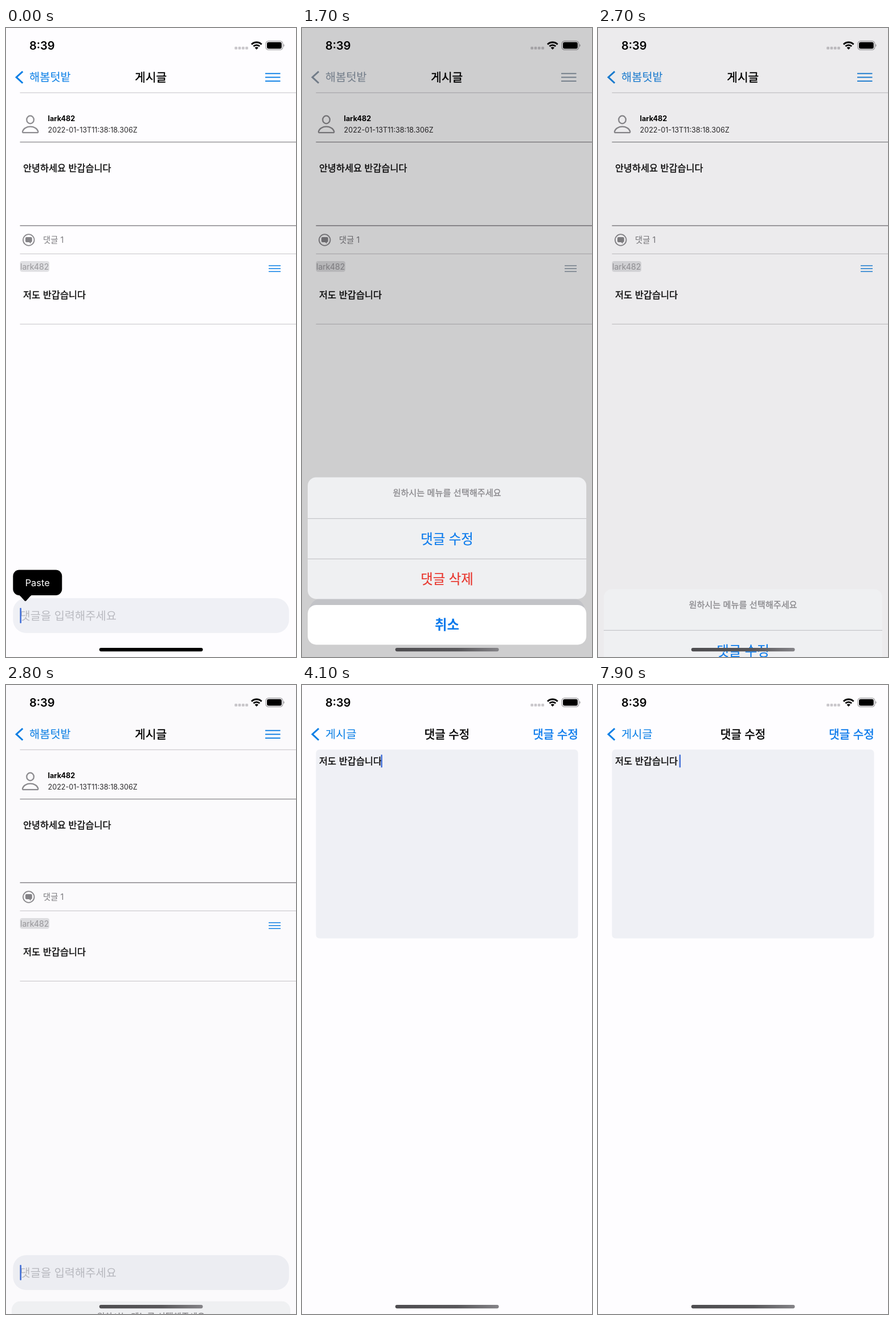
Recreate the animation shown at these times as an HTML page. Size 509 by 1101 pixels, loop 8000 ms.

```html
<!DOCTYPE html>
<html lang="ko">
<head>
<meta charset="utf-8">
<title>댓글 수정</title>
<style>
  html, body { margin: 0; width: 100%; height: 100%; overflow: hidden; background: #fefdff; }
  svg { position: fixed; inset: 0; width: 100%; height: 100%; display: block; }
  text { font-family: Inter, "Noto Sans CJK KR", "Noto Sans CJK", sans-serif; white-space: pre; }
</style>
</head>
<body>
<svg id="stage" viewBox="0 0 509 1101"></svg>
<script>
const W = 509, H = 1101, LOOP = 8000, STEP = 100;
const BG = '#fefdff', FIELD = '#eff0f5', INK = '#000', GREY = '#8a898d', HAIR = '#d0ced2', CARET = '#4370d8';

// Text placed by its vertical middle; bold adds a thin outline of the same colour.
function label(str, x, cy, size, { fill = INK, bold = 0, weight = 400, anchor = 'start', id = '' } = {}) {
  const outline = bold ? ` stroke="${fill}" stroke-width="${bold}"` : '';
  return `<text id="${id}" x="${x}" y="${(cy + size * 0.375).toFixed(1)}" font-size="${size}"` +
    ` font-weight="${weight}" text-anchor="${anchor}" fill="${fill}"${outline}>${str}</text>`;
}
const box = (x, y, w, h, r, fill, more = '') =>
  `<rect x="${x}" y="${y}" width="${w}" height="${h}" rx="${r}" fill="${fill}" ${more}/>`;
const rule = (x, y, x2, color, w = 1.2) =>
  `<path d="M${x} ${y}H${x2}" stroke="${color}" stroke-width="${w}"/>`;
const group = (id, ...parts) => `<g id="${id}">${parts.join('')}</g>`;
const burger = (x, y, w, gap, sw) =>
  [-gap, 0, gap].map(d => rule(x, y + d, x + w, 'currentColor', sw)).join('');

const statusBar = group('status',
  label('8:39', 63.3, 30.6, 20, { weight: 600, anchor: 'middle' }),
  [0, 1, 2, 3].map(i => box(401.3 + i * 6.3, 32.8, 4.7, 4.8, 1.3, '#c9c7cb')).join(''),
  `<g fill="none" stroke="#000" stroke-width="2.9">
     <path d="M431 28.7a12.4 12.4 0 0 1 17.6 0M434.4 32.1a7.6 7.6 0 0 1 10.8 0"/></g>
   <path d="M439.8 37.8l-3.2-3.2a4.6 4.6 0 0 1 6.4 0z"/>`,
  box(456, 22.8, 29.8, 15.4, 4.8, 'none', 'stroke="#a09fa2" stroke-width="1.2"'),
  box(458, 24.8, 25.8, 11.4, 3, INK),
  `<path d="M487 28v5q1.6-.6 1.6-2.5t-1.6-2.5z" fill="#a09fa2"/>`);

const avatar = `<g fill="none" stroke="#8e8d91" stroke-width="2.3">
  <ellipse cx="42.6" cy="160.5" rx="6.3" ry="6.8"/>
  <path d="M31 183.2h23.4q2.4 0 1.9-2.2c-1.4-5.2-7-8.3-13.6-8.3s-12.2 3.1-13.6 8.3q-.5 2.2 1.9 2.2z"/></g>`;
const bubble = `<circle cx="39.8" cy="371" r="9.8" fill="none" stroke="#8a898d" stroke-width="1.8"/>
  <path d="M36 366h7.800q2 0 2 2v5q0 2-2 2h-.3v2.600l-3-2.600h-4.500q-2 0-2-2v-5q0-2 2-2z" fill="#858488"/>`;

const postPage = group('post',
  box(0, 0, W, H, 0, BG),
  rule(24.5, 113.3, W, HAIR),
  avatar,
  label('lark482', 73.5, 158.4, 12.7, { weight: 700 }),
  label('2022-01-13T11:38:18.306Z', 73.5, 178.4, 12.6, { fill: '#2a292b' }),
  rule(24.5, 199.6, W, '#88878b', 1.4),
  label('안녕하세요 반갑습니다', 30, 245, 16.3, { bold: 0.3 }),
  rule(24.5, 346, W, '#88878b', 1.4),
  bubble,
  label('댓글 1', 65, 371, 14.4, { fill: '#7d7c80' }),
  rule(24.5, 395.3, W, HAIR),
  box(24.5, 408, 51.5, 18.8, 4, '#e0e0e3'),
  label('lark482', 25, 417.6, 14.1, { fill: '#98979b' }),
  burger(461, 421.2, 21, 5.1, 1.5),
  label('저도 반갑습니다', 30, 467.3, 16.4, { bold: 0.3 }),
  rule(24.5, 518.3, W, HAIR),
  box(12.3, 998, 484.5, 61, 23, FIELD),
  label('댓글을 입력해주세요', 24.5, 1028.3, 19.8, { fill: '#b9bac0' }),
  box(24.4, 1015, 2.6, 27, 1.2, CARET, 'id="postCaret"'),
  group('paste',
    box(12.3, 948.5, 86, 44.5, 11, INK),
    `<path d="M21 992h26q-3 1-5 3.200l-6.500 7.400q-1.500 1.500-3 0l-6.500-7.400q-2-2.200-5-3.200z"/>`,
    label('Paste', 55.2, 971, 16.4, { fill: '#fff', anchor: 'middle' })),
  box(0, 0, W, H, 0, INK, 'id="postShade"'));

const editPage = group('edit',
  box(0, 0, W, H, 0, BG),
  box(24.5, 113, 460, 330.5, 6, FIELD),
  label('', 30, 133, 16.4, { bold: 0.3, id: 'draft' }),
  box(0, 121.8, 2.5, 22.6, 1.2, CARET, 'id="editCaret"'));

const tinted = { fill: 'currentColor' };
const nav = group('nav',
  `<path d="M29.300 76.200L18.200 86.200L29.300 96.500" fill="none" stroke="currentColor" stroke-width="3"/>`,
  group('backOld', label('해봄텃밭', 41, 86, 19.8, tinted)),
  group('backNew', label('게시글', 41, 86, 19.8, tinted)),
  group('titleOld', label('게시글', 254.2, 86, 20.2, { bold: 0.5, anchor: 'middle' })),
  group('titleNew', label('댓글 수정', 254.5, 86, 20.1, { bold: 0.5, anchor: 'middle' })),
  group('menu', burger(455, 86.3, 26.5, 6.6, 1.9)),
  group('done', label('댓글 수정', 484.8, 86, 20.1, { fill: '#0a7aec', bold: 0.5, anchor: 'end' })));

const centred = (str, cy, size, opt) => label(str, 254.5, cy, size, { anchor: 'middle', ...opt });
const sheet = group('sheet',
  box(10, 766, 489, 213, 15, '#eff0f2'),
  centred('원하시는 메뉴를 선택해주세요', 792.8, 15.2, { fill: '#8a898d', bold: 0.3 }),
  rule(10, 838.2, 499, '#c6c6c9'),
  centred('댓글 수정', 873.5, 23.4, { fill: '#0a7aec', bold: 0.2 }),
  rule(10, 909, 499, '#c6c6c9'),
  centred('댓글 삭제', 944, 23.4, { fill: '#e8372e', bold: 0.2 }),
  box(10, 989.5, 489, 69.5, 15, '#fff'),
  centred('취소', 1024, 23.4, { fill: '#0a7aec', weight: 700 }));

const stage = document.getElementById('stage');
stage.innerHTML = `<defs><linearGradient id="sheen">
    <stop offset="0" stop-color="#4e4d50"/><stop offset=".6" stop-color="#59585b"/>
    <stop offset="1" stop-color="#858488"/></linearGradient></defs>` +
  postPage + editPage + nav + statusBar +
  box(0, 0, W, H, 0, INK, 'id="dim"') + sheet +
  box(163.7, 1085, 181.8, 6.2, 3.1, INK, 'id="home"');

const el = {};
stage.querySelectorAll('[id]').forEach(n => { if (n.id) el[n.id] = n; });

const set = (id, name, value) => el[id].setAttribute(name, value);
const fade = (id, a) => set(id, 'opacity', Math.max(0, Math.min(1, a)).toFixed(3));
const move = (id, x, y = 0) => set(id, 'transform', `translate(${x.toFixed(2)} ${y.toFixed(2)})`);
const mix = (a, b, k) => `rgb(${a.map((v, i) => Math.round(v + (b[i] - v) * k))})`;

// Critically damped spring from 0 to 1.
function spring(t, start, rate) {
  const x = Math.max(0, t - start) * rate / 1000;
  return 1 - (1 + x) * Math.exp(-x);
}
// Last value whose time has come.
const at = (t, keys) => keys.reduce((v, [time, next]) => t >= time ? next : v, keys[0][1]);

const POST_CARET = [[0, 1], [500, .45], [600, 0], [900, .5], [1000, 1], [1500, .45], [1600, 0], [2000, 1]];
const EDIT_CARET = [[0, 0], [4100, 1], [4600, .45], [4700, 0], [5000, 1], [5500, .65], [5600, .2], [5700, 0],
  [5900, .5], [6000, 1], [6800, .5], [6900, 0], [7300, .3], [7400, .7], [7500, 1]];
const TYPED = [[0, ''], [5000, ' '], [6200, ' ㄴ'], [6300, ' 너'], [6400, ' 넘'], [7800, ' 너'], [7900, ' ']];
const CARET_X = [138.500, 142.600, 157.700];

function draw(t) {
  const open = t < 2600 ? spring(t, 1450, 18) : 1 - spring(t, 2600, 22);
  const push = spring(t, 2950, 16), rest = 1 - push;

  stage.style.color = mix([10, 127, 230], [156, 155, 159], open * open);
  move('sheet', 0, 335 * (1 - open));
  set('sheet', 'visibility', open > 0.002 ? 'visible' : 'hidden');
  fade('dim', 0.2 * open);

  move('post', -0.3 * W * push);
  fade('postShade', 0.1 * push);
  fade('postCaret', at(t, POST_CARET));
  fade('paste', t < 1500 ? 1 : 0);
  move('edit', W * rest);

  move('backOld', -110 * push);
  fade('backOld', 1 - push * 2);
  move('titleOld', -186 * push);
  fade('titleOld', 1 - push * 1.6);
  move('backNew', 186 * rest);
  fade('backNew', push * 2 - 1);
  move('titleNew', 230 * rest);
  fade('titleNew', push * 1.5 - 0.5);
  fade('menu', 1 - push * 2);
  fade('done', push * 2 - 1);

  const typed = at(t, TYPED);
  el.draft.textContent = '저도 반갑습니다' + typed;
  set('editCaret', 'x', CARET_X[typed.length]);
  fade('editCaret', at(t, EDIT_CARET));
  set('home', 'fill', t < 1500 ? INK : 'url(#sheen)');
}

const begin = performance.now();
function tick(now) {
  const t = Math.max(0, now - begin) % LOOP;
  draw(Math.floor(t / STEP) * STEP);
  requestAnimationFrame(tick);
}
draw(0);
requestAnimationFrame(tick);
</script>
</body>
</html>
```
